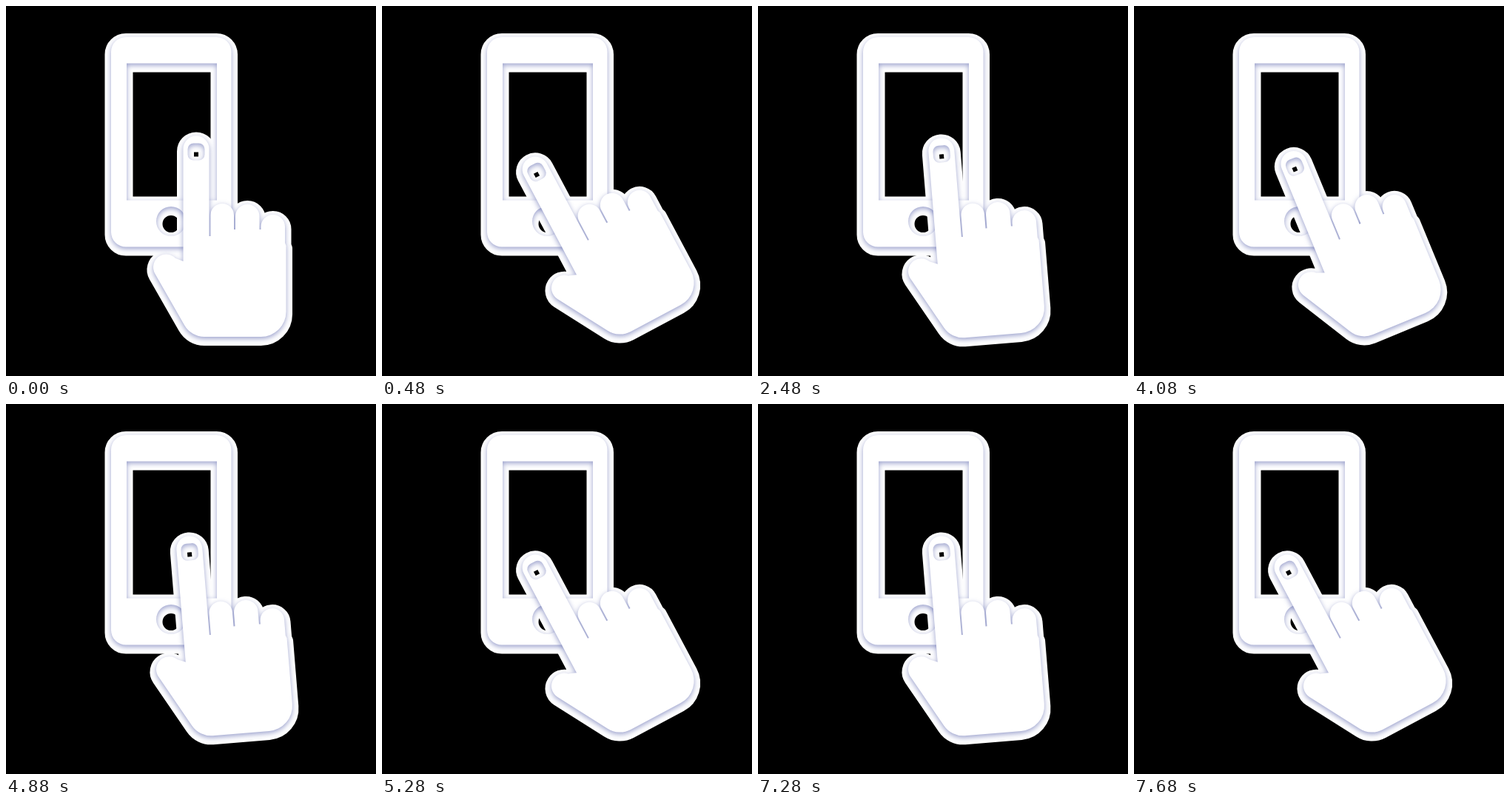
An HTML page with a canvas for the animation above (8000 ms loop, 500 by 500 pixels).

```html
<!DOCTYPE html>
<html lang="en">
<head>
<meta charset="utf-8">
<title>Tap and swipe</title>
<style>
html, body { margin: 0; width: 100%; height: 100%; overflow: hidden; background: #000; }
canvas { display: block; width: 500px; height: 500px; }
</style>
</head>
<body>
<canvas id="stage" width="500" height="500"></canvas>
<script>
const ctx = document.getElementById('stage').getContext('2d');
const LOOP = 8000, CYCLE = 2400, STEP = 80;
const SWING = 28 * Math.PI / 180;
const PIVOT = { x: 288, y: 307 };
const DROP = 3.5;   // how far the white rim sits below its shape
const SPREAD = 8.5; // width of the white rim
const rad = deg => deg * Math.PI / 180;

function phonePath() {
  const p = new Path2D();
  p.roundRect(142, 42, 162.5, 283.5, 20);
  p.rect(163, 77.5, 122, 185);
  p.moveTo(243, 291);
  p.arc(223, 291, 20, 0, Math.PI * 2);
  return p;
}

function handPath() {
  const p = new Path2D();
  // index finger
  p.moveTo(239.5, 345);
  p.lineTo(239.5, 193);
  p.arc(257, 193, 17.5, Math.PI, 0);
  // three folded fingers: left, right, top, slot depth
  const folded = [
    [276.5, 308, 267, 311],
    [310, 342.5, 268, 302],
    [344.5, 377, 282, 302]
  ];
  for (const [l, r, top, depth] of folded) {
    const w = (r - l) / 2;
    p.lineTo(l - 2, depth);
    p.lineTo(l, depth);
    p.lineTo(l, top + w);
    p.arc(l + w, top + w, w, Math.PI, 0);
  }
  // palm
  p.lineTo(377, 320);
  p.lineTo(378.5, 324);
  p.arcTo(378.5, 447, 340, 447, 34);
  p.arcTo(250, 447, 201.3, 361.2, 31);
  // thumb
  p.arc(216.5, 353, 17.5, rad(150), rad(-45));
  p.closePath();
  // fingertip opening
  p.roundRect(245.5, 185.5, 23, 23, 8);
  return p;
}

const phone = phonePath(), hand = handPath();

function turn(angle) {
  ctx.translate(PIVOT.x, PIVOT.y);
  ctx.rotate(-angle);
  ctx.translate(-PIVOT.x, -PIVOT.y);
}

function rim(path, angle) {
  ctx.save();
  ctx.translate(0, DROP);
  turn(angle);
  ctx.fillStyle = ctx.strokeStyle = '#fff';
  ctx.lineWidth = SPREAD * 2;
  ctx.lineJoin = 'round';
  ctx.fill(path, 'evenodd');
  ctx.stroke(path);
  ctx.restore();
}

function body(path, angle) {
  ctx.save();
  turn(angle);
  ctx.shadowColor = 'rgba(80, 90, 166, 0.58)';
  ctx.shadowBlur = 7.5;
  ctx.shadowOffsetY = 2.5;
  ctx.fillStyle = '#fff';
  ctx.fill(path, 'evenodd');
  ctx.restore();
}

// Swing out in six steps, hold, swing back in five, rest
function swingAt(time) {
  const n = Math.floor((time % LOOP) % CYCLE / STEP);
  const k = n <= 6 ? n / 6 : Math.min(1, Math.max(0, (25 - n) / 5));
  return SWING * k;
}

function draw(time) {
  const angle = swingAt(time);
  ctx.fillStyle = '#000';
  ctx.fillRect(0, 0, 500, 500);
  rim(phone, 0);
  rim(hand, angle);
  body(phone, 0);
  body(hand, angle);
}

const start = performance.now();
function frame(now) {
  draw(Math.max(0, now - start));
  requestAnimationFrame(frame);
}
draw(0);
requestAnimationFrame(frame);
</script>
</body>
</html>
```
